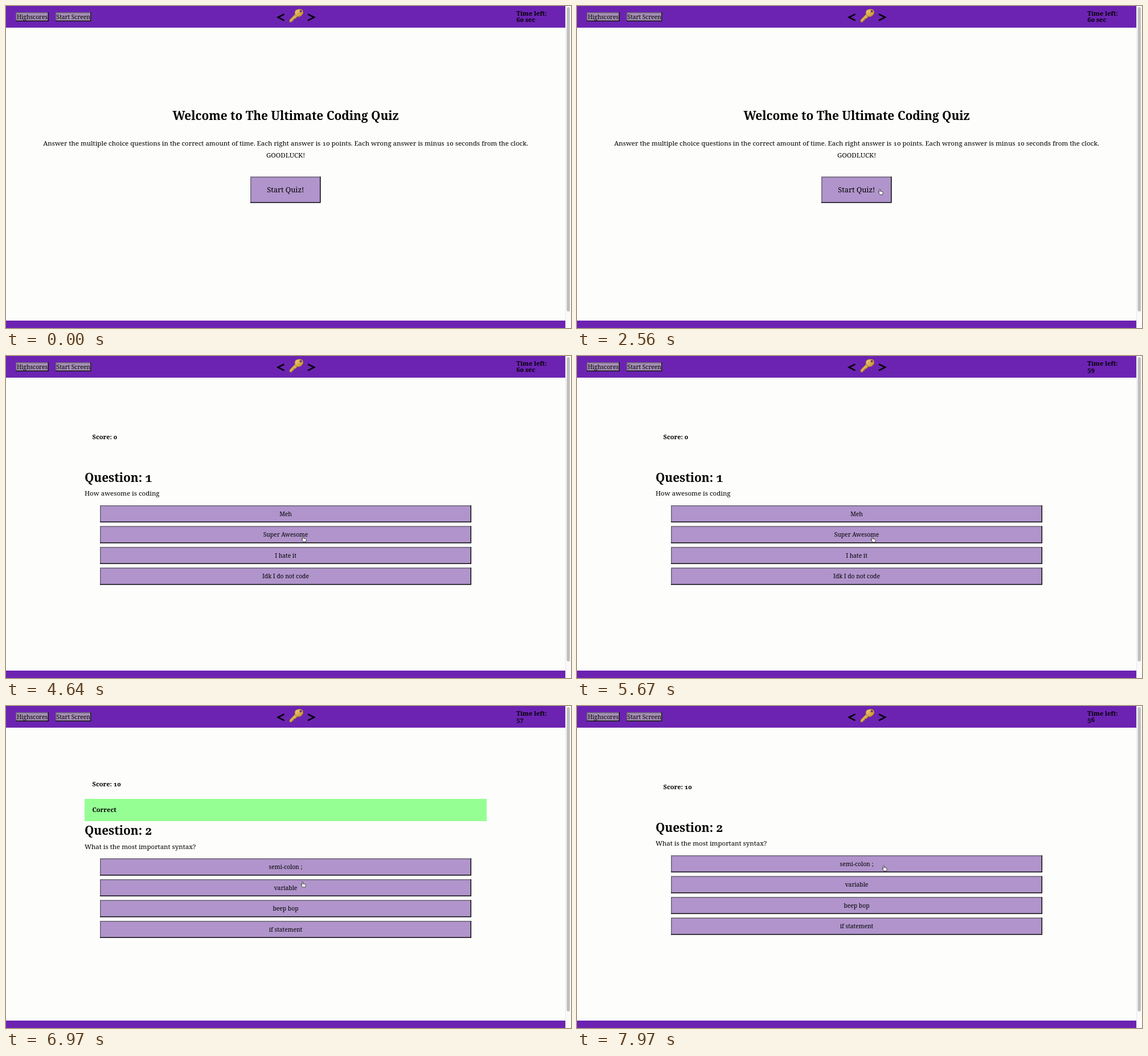
Recreate the animation shown at these times as an HTML page. Size 992 by 565 pixels, loop 7.99 s.

```html
<!DOCTYPE html>
<html lang="en">
<head>
<meta charset="utf-8">
<title>Coding Quiz</title>
<style>
  html, body { margin: 0; width: 100%; height: 100%; overflow: hidden; background: #fdfdfb; }
  svg { display: block; width: 100%; height: 100%; }
  text { font-family: "Noto Serif", Georgia, serif; font-variant-numeric: oldstyle-nums; white-space: pre; }
</style>
</head>
<body>
<svg viewBox="0 0 992 565">
  <defs>
    <linearGradient id="gold" x1="0" y1="0" x2="1" y2="1">
      <stop offset="0" stop-color="#f3d27a"/>
      <stop offset="1" stop-color="#c1892a"/>
    </linearGradient>
  </defs>
  <rect width="992" height="565" fill="#fdfdfb"/>
  <path d="M0 0H982V38H0ZM0 552H982V565H0Z" fill="#6c23b2"/>
  <rect x="982" width="10" height="565" fill="#fafafa"/>
  <path d="M982.5 0V565" stroke="#e8e8e8"/>
  <rect x="984.5" y="2" width="5.5" height="534" rx="2.75" fill="#bfbfbf"/>
  <path d="M488.5 14.3 477.5 19.8 488.5 25.3M530 14.3 541 19.8 530 25.3" fill="none" stroke="#000" stroke-width="2.5"/>
  <g stroke="#8f6a22" stroke-width=".7">
    <path d="M508.5 13.5 498 24.5 498 28.3 502 28 502.6 25.6 505 25.4 505.2 22.8 507.8 22.4 512.5 18Z" fill="url(#gold)"/>
    <path fill-rule="evenodd" d="M508.5 7.5Q513 4.5 519 6Q522.5 8 521.5 13Q519 18.5 513.5 19Q507.5 18 507 13Q507 9.5 508.5 7.5ZM515.7 9.2a1.9 1.9 0 1 0 3.8 0a1.9 1.9 0 1 0-3.8 0Z" fill="url(#gold)"/>
  </g>
  <g id="page"></g>
  <g id="cursor" fill="#fff" stroke="#222" stroke-width=".8" stroke-linejoin="round">
    <path id="hand" d="M-2.3 1V-4.3Q-1.4-5.6-.5-4.3V-1L3.2-.2Q4.4.2 4.3 1.6L3.4 5H-1L-4.2.2Q-3.8-1-2.3 1Z"/>
    <path id="arrow" d="M-2-5V4.5L.3 2.4 1.8 5.6 3.2 5 1.7 1.8H4.8Z" fill="#111" stroke="#fff"/>
  </g>
</svg>
<script>
const LOOP = 7990;
const START_DOWN = 3690, START_UP = 3840, ANSWER_DOWN = 6240, ANSWER_UP = 6330, BANNER_END = 7330;
const QUESTIONS = [
  ["How awesome is coding", "Meh", "Super Awesome", "I hate it", "Idk I do not code"],
  ["What is the most important syntax?", "semi-colon ;", "variable", "beep bop", "if statement"],
];
// time, x, y of the pointer's centre
const PATH = [
  [270, 625, 580], [700, 560, 390], [1060, 535, 328], [1220, 533, 326], [2560, 533, 326],
  [3140, 530, 326], [4230, 530, 326], [4280, 525, 322], [4640, 523, 321], [4970, 522, 321],
  [5460, 522, 321], [6240, 515, 324], [6830, 515, 324], [6970, 522, 313], [7520, 538, 288],
  [7650, 538, 288], [7970, 540, 284.5],
];
const el = id => document.getElementById(id);

const label = (x, y, size, text, { bold, middle } = {}) =>
  `<text x="${x}" y="${y}" font-size="${size}" font-weight="${bold ? 700 : 400}"
    text-anchor="${middle ? "middle" : "start"}">${text}</text>`;

function button(x, y, w, h, size, text, pressed = false, fill = "#b094cb") {
  const [lit, shade] = pressed ? ["#111", "#6b6574"] : ["#6b6574", "#111"];
  const edge = (d, color) => `<path d="${d}" fill="none" stroke="${color}" stroke-width="1.5"/>`;
  const l = x + .75, t = y + .75, r = x + w - .75, b = y + h - .75;
  return `<rect x="${x}" y="${y}" width="${w}" height="${h}" fill="${fill}"/>` +
    edge(`M${l} ${y + h}V${t}H${x + w}`, lit) + edge(`M${x} ${b}H${r}V${y}`, shade) +
    label(x + w / 2, y + h / 2 + size * .36, size, text, { middle: true });
}

function welcome(pressed) {
  const middle = true;
  return label(491, 200, 20.8, "Welcome to The Ultimate Coding Quiz", { bold: true, middle }) +
    label(491, 245, 11.5, "Answer the multiple choice questions in the correct amount of time. " +
      "Each right answer is 10 points. Each wrong answer is minus 10 seconds from the clock.", { middle }) +
    label(491, 266, 11.5, "GOODLUCK!", { middle }) +
    button(429, 299.5, 123.5, 46, 12.8, "Start Quiz!", pressed);
}

function question(index, banner, pressed) {
  const [prompt, ...options] = QUESTIONS[index];
  const shift = banner ? 5.5 : 0, bold = true;
  return label(151.5, 146 - shift, 11, `Score: ${index * 10}`, { bold }) +
    (banner ? `<rect x="138" y="163" width="706" height="39" fill="#96ff94"/>` +
      label(151.5, 186, 11, "Correct", { bold }) : "") +
    label(138, 220.5 + shift, 20.8, `Question: ${index + 1}`, { bold }) +
    label(138, 245 + shift, 11.5, prompt) +
    options.map((text, i) =>
      button(165, 262 + shift + i * 36.5, 652, 30, 10.3, text, pressed && i === 1)).join("");
}

function header(clock) {
  return button(17, 11, 58, 16, 10.3, "Highscores", false, "#a58fb5") +
    button(87, 11, 62.5, 16, 10.3, "Start Screen", false, "#a58fb5") +
    label(896, 17.3, 11, "Time left:", { bold: true }) + label(896, 28.3, 11, clock, { bold: true });
}

function pointerAt(t) {
  const next = PATH.findIndex(p => p[0] > t);
  if (next === 0) return PATH[0].slice(1);
  if (next < 0) return PATH.at(-1).slice(1);
  const [t0, x0, y0] = PATH[next - 1], [t1, x1, y1] = PATH[next];
  const k = (t - t0) / (t1 - t0);
  return [x0 + (x1 - x0) * k, y0 + (y1 - y0) * k];
}

function overButton(t, x, y) {
  if (t < START_UP) return x > 429 && x < 552 && y > 300 && y < 345;
  const row = y - 262 - (t >= ANSWER_UP && t < BANNER_END ? 5.5 : 0);
  return row >= 0 && row % 36.5 < 30;
}

let shown = "";
function frame(now) {
  const t = now % LOOP;
  const ticks = Math.floor((t - START_UP + 10) / 1000);
  const clock = ticks < 1 ? "60 sec" : String(60 - ticks);
  const body = t < START_UP ? welcome(t >= START_DOWN)
    : t < ANSWER_UP ? question(0, false, t >= ANSWER_DOWN)
    : question(1, t < BANNER_END, false);
  const markup = header(clock) + body;
  if (markup !== shown) el("page").innerHTML = shown = markup;

  const [x, y] = pointerAt(t);
  const hand = overButton(t, x - 1, y - 5);
  el("cursor").setAttribute("transform", `translate(${x} ${y})`);
  el("hand").style.display = hand ? "" : "none";
  el("arrow").style.display = hand ? "none" : "";
  requestAnimationFrame(frame);
}
requestAnimationFrame(frame);
</script>
</body>
</html>
```
